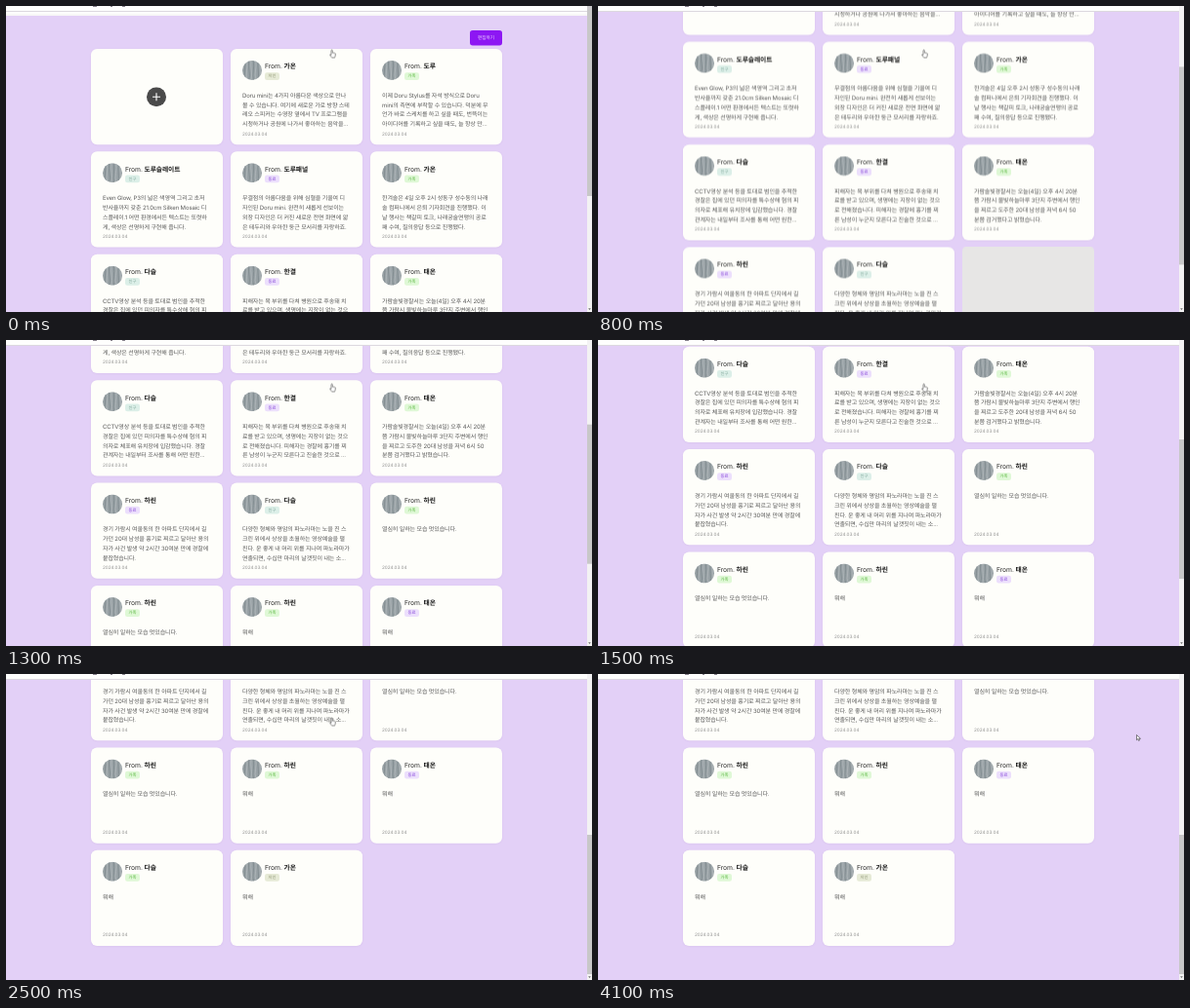
An HTML page that plays this animation: 600x314 px, repeating every 4.2 s.

```html
<!DOCTYPE html>
<html>
<head>
<meta charset="utf-8">
<title>Message board</title>
<style>
html, body { margin: 0; width: 100%; height: 100%; overflow: hidden; }
#stage {
  position: absolute; left: 0; top: 0; width: 600px; height: 314px; overflow: hidden;
  background: #e3d0f7; font-family: Inter, 'Noto Sans CJK KR', 'Noto Sans CJK', sans-serif;
  text-rendering: geometricPrecision;
}
#stage * { box-sizing: border-box; }
#stage > * { position: absolute; }

/* The board is laid out at four times its size so small text keeps its spacing. */
#zoom { left: 0; top: 0; width: 2400px; height: 1256px; transform: scale(.25); transform-origin: 0 0; }
#board { position: absolute; left: 0; top: 0; width: 2400px; animation: scroll 4.2s infinite; }
#board > * { position: absolute; }
.band { left: 0; top: 0; width: 2400px; height: 37px; background: #fefefc; border-bottom: 2px solid #e4e0e8; }
.edit {
  left: 1900px; top: 100px; width: 132px; height: 62px; border-radius: 11px; background: #8d17f3;
  color: #f3e4ff; font-size: 18.5px; font-weight: 500; line-height: 60px; text-align: center;
}
.card {
  width: 540px; height: 393px; border-radius: 25px; background: #fefefa;
  box-shadow: 0 2px 10px rgba(60, 20, 90, .06); white-space: nowrap;
}
.card > * { position: absolute; margin: 0; }
.face { left: 48px; top: 48px; width: 80px; height: 80px; border-radius: 50%; }
.from { left: 140px; top: 52px; font-size: 27px; line-height: 40px; letter-spacing: -.3px; color: #2c2c2c; }
.from b { color: #181818; font-weight: 700; }
.tag {
  left: 140px; top: 97px; width: 60px; height: 31px; border-radius: 9px;
  font-size: 17px; line-height: 30px; text-align: center;
}
.text { left: 48px; top: 171px; font-size: 24px; line-height: 39.2px; letter-spacing: -.5px; color: #585858; }
.date { left: 48px; top: 334px; font-size: 18.6px; line-height: 28px; color: #8f8f8f; }
.plus { left: 228px; top: 157px; width: 80px; height: 80px; }
.late { visibility: hidden; animation: show-late 4.2s step-end infinite; }
.last { visibility: hidden; animation: show-last 4.2s step-end infinite; }
.blank { background: #e7e6e5; box-shadow: none; border-radius: 16px; animation: hide-blank 4.2s step-end infinite; }

#head { left: 0; top: 0; width: 595px; height: 5.5px; background: #fefefd; border-bottom: .6px solid #dcd8df; }
#head i { position: absolute; top: 0; height: .8px; background: #8a858f; }
#bar { left: 595px; top: 0; width: 5px; height: 314px; background: #f3f2f3; overflow: hidden; }
#thumb { position: absolute; left: .2px; top: 0; width: 4.8px; height: 203px; background: #c8c7c8; animation: thumb 4.2s infinite; }
#bar svg { position: absolute; left: 0; top: 308px; width: 5px; height: 6px; background: #f3f2f3; }
#mouse { left: 0; top: 0; width: 10px; height: 12px; animation: move 4.2s infinite; }
#mouse svg { position: absolute; left: 0; top: 0; overflow: visible; }
.hand { animation: hand 4.2s step-end infinite; }
.arrow { visibility: hidden; animation: arrow 4.2s step-end infinite; }

@keyframes scroll {
  0%, 4.762% { transform: translateY(0); animation-timing-function: steps(2); }
  9.524% { transform: translateY(-96px); animation-timing-function: steps(7); }
  26.19% { transform: translateY(-716px); animation-timing-function: steps(4); }
  35.714% { transform: translateY(-992px); animation-timing-function: steps(4); }
  45.238% { transform: translateY(-1304px); animation-timing-function: steps(4); }
  54.762%, 100% { transform: translateY(-1560px); }
}
@keyframes thumb {
  0%, 4.762% { transform: translateY(-8px); height: 203px; animation-timing-function: steps(2); }
  9.524% { transform: translateY(7px); height: 203px; animation-timing-function: steps(7); }
  26.19% { transform: translateY(104px); height: 203px; animation-timing-function: step-end; }
  28.571% { transform: translateY(79px); height: 143px; animation-timing-function: steps(3); }
  35.714% { transform: translateY(102px); height: 143px; animation-timing-function: steps(4); }
  45.238% { transform: translateY(137px); height: 143px; animation-timing-function: steps(4); }
  54.762%, 100% { transform: translateY(165px); height: 143px; }
}
@keyframes show-late { 0% { visibility: hidden; } 28.571%, 100% { visibility: visible; } }
@keyframes show-last { 0% { visibility: hidden; } 47.619%, 100% { visibility: visible; } }
@keyframes hide-blank { 0% { visibility: visible; } 28.571%, 100% { visibility: hidden; } }
@keyframes move {
  0%, 61.905% { transform: translate(331px, 44.5px); animation-timing-function: steps(5); }
  73.81%, 100% { transform: translate(551px, 62px); }
}
@keyframes hand { 0% { visibility: visible; } 71.429%, 100% { visibility: hidden; } }
@keyframes arrow { 0% { visibility: hidden; } 71.429%, 100% { visibility: visible; } }
</style>
</head>
<body>
<div id="stage">
  <svg width="0" height="0">
    <symbol id="face" viewBox="0 0 80 80">
      <rect width="80" height="80" fill="#98a1a5"/>
      <g fill="none" stroke-width="3">
        <path stroke="#7e888d" d="M10 0q3 20 0 40t2 40M27 0q-3 22 1 42t-1 38M45 0q3 24 0 44t1 36M65 0q-3 20 0 40t-2 40"/>
        <path stroke="#b3babd" d="M18 0q3 22 0 42t1 38M36 0q-2 20 1 40t-1 40M55 0q3 20-1 40t2 40M73 0q-2 22 0 44t-2 36"/>
      </g>
    </symbol>
  </svg>

  <div id="zoom"><div id="board">
    <div class="band"></div>
    <div class="edit">편집하기</div>
  </div></div>

  <div id="head">
    <i style="left:89px;width:4px"></i><i style="left:107px;width:2px"></i>
    <i style="left:119px;width:3px"></i>
  </div>
  <div id="bar">
    <div id="thumb"></div>
    <svg viewBox="0 0 5 6"><path d="M1.2 2.2h2.6L2.5 4z" fill="#666"/></svg>
  </div>
  <div id="mouse">
    <svg class="hand" width="7" height="9" viewBox="0 0 14 18">
      <path d="M4 10V2.5a1.3 1.3 0 0 1 2.6 0V7l5 1q1.4.4 1.2 2l-.8 4.5-1 2.5H5.5L1 11.5q0-2 3-.2z" fill="#fff" stroke="#555" stroke-width="1.3" stroke-linejoin="round"/>
    </svg>
    <svg class="arrow" width="5" height="7" viewBox="0 0 10 14">
      <path d="M1 1v10.5l2.5-2.2L5.2 13l1.8-.8L5.4 8.6H9z" fill="#fff" stroke="#333" stroke-width="1.2" stroke-linejoin="round"/>
    </svg>
  </div>
</div>

<script>
const tags = {
  지인: ['#e6ead6', '#8b9170'],
  가족: ['#dff8d6', '#56b53b'],
  동료: ['#ecdffc', '#8646d8'],
  친구: ['#dcefe8', '#7fa799']
};

// Sender, relation, message lines; the first slot holds the add button.
const notes = [
  ['가온', '지인', 'Doru mini는 4가지 아름다운 색상으로 만나|볼 수 있습니다. 여기에 새로운 가로 방향 스테|레오 스피커는 수영장 옆에서 TV 프로그램을|시청하거나 공원에 나가서 좋아하는 음악을...'],
  ['도루', '가족', '이제 Doru Stylus를 자석 방식으로 Doru|mini의 측면에 부착할 수 있습니다. 덕분에 무|언가 바로 스케치를 하고 싶을 때도, 번뜩이는|아이디어를 기록하고 싶을 때도, 늘 항상 만...'],
  ['도루슬레이트', '친구', 'Even Glow, P3의 넓은 색영역 그리고 초저|반사율까지 갖춘 21.0cm Silken Mosaic 디|스플레이.1 어떤 환경에서든 텍스트는 또렷하|게, 색상은 선명하게 구현해 줍니다.'],
  ['도루패널', '동료', '무결점의 아름다움을 위해 심혈을 기울여 디|자인된 Doru mini. 완전히 새롭게 선보이는|외장 디자인은 더 커진 새로운 전면 화면에 얇|은 테두리와 우아한 둥근 모서리를 자랑하죠.'],
  ['가온', '가족', '한겨솔은 4일 오후 2시 성동구 성수동의 나래|솔 컴퍼니에서 은퇴 기자회견을 진행했다. 이|날 행사는 책갈피 토크, 나래궁술연맹의 공로|패 수여, 질의응답 등으로 진행됐다.'],
  ['다슬', '친구', 'CCTV영상 분석 등을 토대로 범인을 추적한|경찰은 집에 있던 피의자를 특수상해 혐의 피|의자로 체포해 유치장에 입감했습니다. 경찰|관계자는 내일부터 조사를 통해 어떤 원한...'],
  ['한결', '동료', '피해자는 목 부위를 다쳐 병원으로 후송돼 치|료를 받고 있으며, 생명에는 지장이 없는 것으|로 전해졌습니다. 피해자는 경찰에 흉기를 찌|른 남성이 누군지 모른다고 진술한 것으로 ...'],
  ['태온', '가족', '가람솔빛경찰서는 오늘(4일) 오후 4시 20분|쯤 가람시 물빛하늘마루 3단지 주변에서 행인|을 찌르고 도주한 20대 남성을 저녁 6시 50|분쯤 검거했다고 밝혔습니다.'],
  ['하린', '동료', '경기 가람시 여울동의 한 아파트 단지에서 길|가던 20대 남성을 흉기로 찌르고 달아난 용의|자가 사건 발생 약 2시간 30여분 만에 경찰에|붙잡혔습니다.'],
  ['다슬', '친구', '다양한 형체와 명암의 파노라마는 노을 진 스|크린 위에서 상상을 초월하는 영상예술을 펼|친다. 운 좋게 내 머리 위를 지나며 파노라마가|연출되면, 수십만 마리의 날갯짓이 내는 소...'],
  ['하린', '가족', '열심히 일하는 모습 멋있습니다.'],
  ['하린', '가족', '열심히 일하는 모습 멋있습니다.'],
  ['하린', '가족', '뭐해'],
  ['태온', '동료', '뭐해'],
  ['다슬', '가족', '뭐해'],
  ['가온', '지인', '뭐해']
];

const board = document.getElementById('board');

function addCard(slot, kind, html) {
  const card = document.createElement('div');
  card.className = 'card ' + kind;
  card.style.left = 348 + slot % 3 * 572 + 'px';
  card.style.top = 176 + Math.floor(slot / 3) * 421.4 + 'px';
  card.innerHTML = html;
  board.append(card);
}

addCard(0, '', `<svg class="plus" viewBox="0 0 80 80"><circle cx="40" cy="40" r="40" fill="#4a4a4a"/>
  <path d="M24 40h32M40 24v32" stroke="#fff" stroke-width="4.5"/></svg>`);
addCard(11, 'blank', '');

notes.forEach(([name, tag, text], i) => {
  const slot = i + 1;
  const [fill, ink] = tags[tag];
  const kind = slot > 15 ? 'last' : slot > 10 ? 'late' : '';
  addCard(slot, kind, `<svg class="face"><use href="#face"/></svg>
    <p class="from">From. <b>${name}</b></p>
    <p class="tag" style="background:${fill};color:${ink}">${tag}</p>
    <p class="text">${text.replaceAll('|', '<br>')}</p>
    <p class="date">2024.03.04</p>`);
});
</script>
</body>
</html>
```
